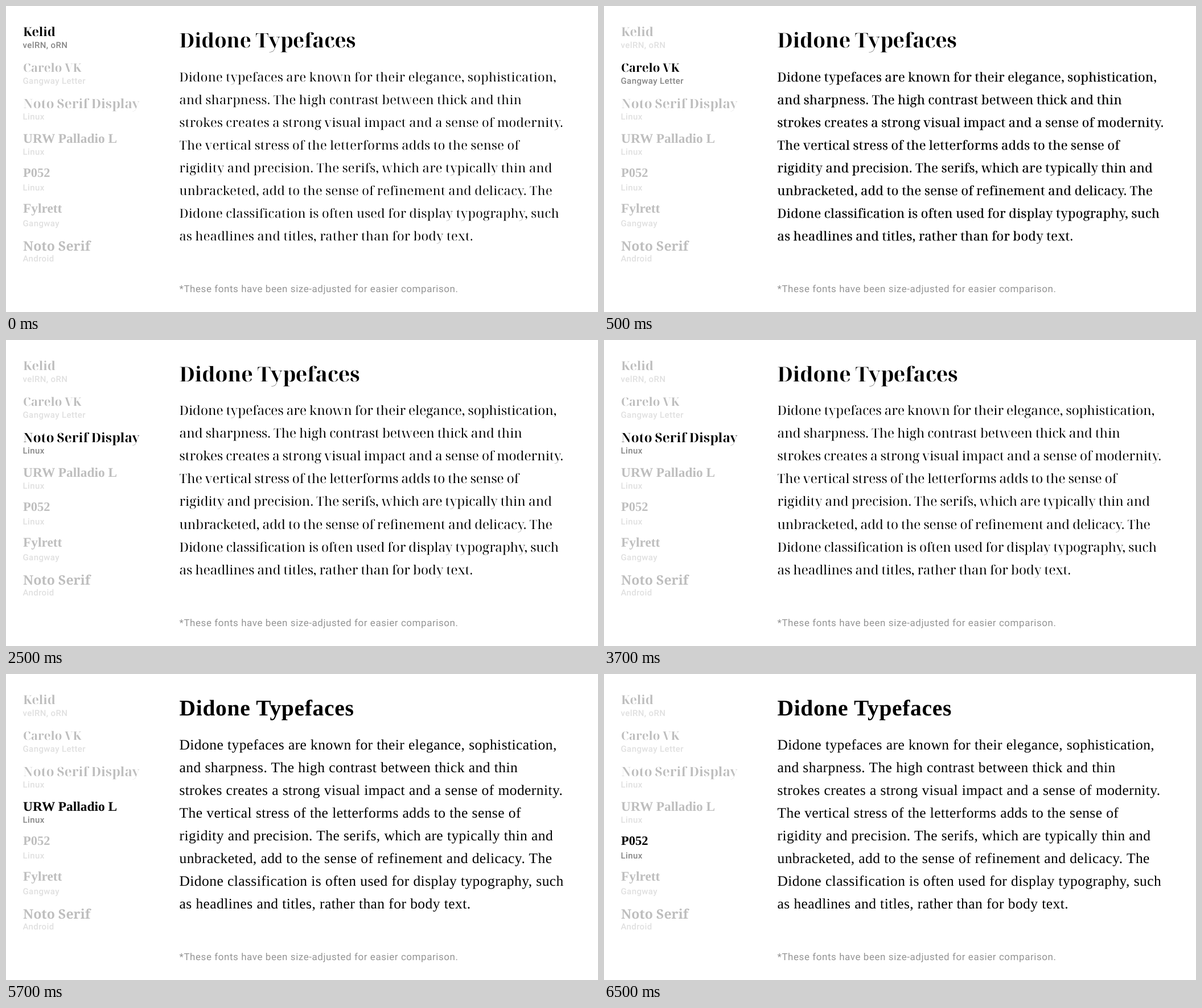
An HTML page for the animation above (8000 ms loop, 1040x539 px).

```html
<!DOCTYPE html>
<html lang="en">
<head>
<meta charset="utf-8">
<title>Didone Typefaces</title>
<style>
  html, body { margin: 0; width: 100%; height: 100%; overflow: hidden; background: #fff; }
  svg { display: block; width: 1040px; height: 539px; }
  text { text-rendering: geometricPrecision; white-space: pre; }
  .sub, .note { font-family: Roboto, "Open Sans", sans-serif; }
  .sub { font-size: 15px; font-weight: 500; letter-spacing: .4px; fill: #868686; }
  .note { font-size: 17px; letter-spacing: .56px; fill: #949494; }
  .entry { opacity: .25; }
  .entry.on { opacity: 1; }
</style>
</head>
<body>
<svg id="stage" viewBox="0 0 1040 539"></svg>
<script>
const stage = document.getElementById("stage");
const LOOP = 8000;
const STARTS = [0, 500, 2500, 4500, 6500];

const LINES = [
  "Didone typefaces are known for their elegance, sophistication,",
  "and sharpness. The high contrast between thick and thin",
  "strokes creates a strong visual impact and a sense of modernity.",
  "The vertical stress of the letterforms adds to the sense of",
  "rigidity and precision. The serifs, which are typically thin and",
  "unbracketed, add to the sense of refinement and delicacy. The",
  "Didone classification is often used for display typography, such",
  "as headlines and titles, rather than for body text."
];

const DISPLAY = '"Noto Serif Display", "Liberation Serif", serif';
const BOOK = '"Liberation Serif", serif';
const NOTO = '"Noto Serif", serif';

// [name, name baseline, family, size, system, system baseline]
const ENTRIES = [
  ["Kelid", 53, DISPLAY, 21.6, "velRN, oRN", 74],
  ["Carelo VK", 116, DISPLAY, 20.6, "Gangway Letter", 137],
  ["Noto Serif Display", 179.5, DISPLAY, 22.55, "Linux", 199.5],
  ["URW Palladio L", 241, BOOK, 23.4, "Linux", 262],
  ["P052", 301, BOOK, 22.5, "Linux", 325],
  ["Fylrett", 364, BOOK, 23.4, "Gangway", 387.5],
  ["Noto Serif", 431, NOTO, 23.1, "Android", 450]
];

// title and body: [size, letter spacing]; heft thickens the body strokes
const STYLES = [
  { family: DISPLAY, title: [34.9, 0], body: [21.8, .35], base: 132.5, heft: 0 },
  { family: DISPLAY, title: [35.5, 0], body: [21.8, .42], base: 132.5, heft: .35 },
  { family: DISPLAY, title: [35.7, 0], body: [22.55, 0], base: 132, heft: 0 },
  { family: BOOK, title: [39.5, .7], body: [25.5, .43], base: 132.5, heft: 0 },
  { family: BOOK, title: [39.5, .66], body: [25.5, .42], base: 132.5, heft: 0 }
];

function add(parent, tag, attrs, content = "") {
  const node = document.createElementNS("http://www.w3.org/2000/svg", tag);
  for (const key in attrs) node.setAttribute(key, attrs[key]);
  node.textContent = content;
  return parent.appendChild(node);
}

function setType(node, family, [size, gap], weight) {
  Object.assign(node.style, {
    fontFamily: family, fontSize: size + "px", fontWeight: weight, letterSpacing: gap + "px"
  });
}

const entries = ENTRIES.map(([name, y, family, size, system, subY]) => {
  const group = add(stage, "g", { class: "entry" });
  setType(add(group, "text", { x: 30, y }, name), family, [size, 0], family === NOTO ? 600 : 700);
  add(group, "text", { x: 29.5, y: subY, class: "sub" }, system);
  return group;
});

const title = add(stage, "text", { x: 304.5, y: 72.5 }, "Didone Typefaces");
const body = LINES.map(line => add(stage, "text", { x: 304.5, stroke: "#000" }, line));
add(stage, "text", { x: 304.5, y: 504, class: "note" },
  "*These fonts have been size-adjusted for easier comparison.");

let shown = -1;
function show(index) {
  if (index === shown) return;
  shown = index;
  const style = STYLES[index];
  entries.forEach((entry, i) => entry.classList.toggle("on", i === index));
  setType(title, style.family, style.title, 700);
  body.forEach((line, i) => {
    setType(line, style.family, style.body, 400);
    line.setAttribute("stroke-width", style.heft);
    line.setAttribute("y", style.base + i * 40.1);
  });
}

const begin = performance.now();
function tick() {
  const t = (performance.now() - begin) % LOOP;
  show(STARTS.filter(start => start <= t).length - 1);
  requestAnimationFrame(tick);
}
tick();
</script>
</body>
</html>
```
